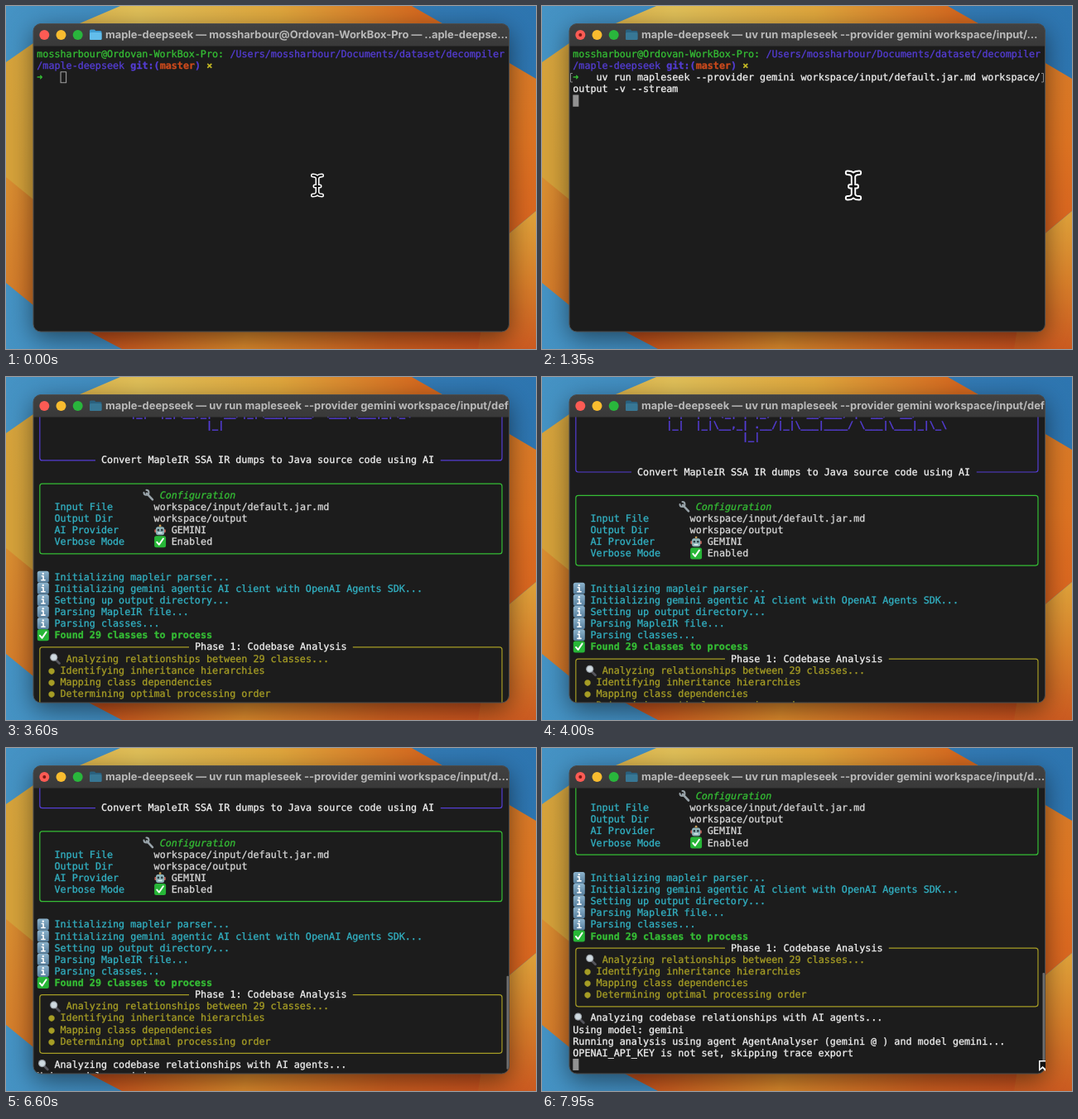
Recreate the animation shown at these times as an HTML page with a canvas. Size 640 by 415 pixels, loop 8 s.

```html
<!DOCTYPE html>
<html lang="en">
<head>
<meta charset="utf-8">
<title>Terminal session</title>
<style>
html, body { margin: 0; width: 100%; height: 100%; overflow: hidden; background: #000; }
canvas { display: block; width: 640px; height: 415px; }
</style>
</head>
<body>
<canvas id="stage"></canvas>
<script>
const W = 640, H = 415, LOOP = 8000;
const CELL = 7.065, ROW = 14.13, LEFT = 37.3, FIRST_BASELINE = 62;
const MONO = '11.735px "DejaVu Sans Mono", monospace';
const USER = 'mossharbour', HOST = 'Ordovan-WorkBox-Pro';
const GREEN = '#35bd35', BLUE = '#543dd4', CYAN = '#32b1c3', YELLOW = '#a69d25',
      GRAY = '#d6d6d6', WHITE = '#f0f0f0', ORANGE = '#cc4a1c';

const canvas = document.getElementById('stage');
const ctx = canvas.getContext('2d');
const ratio = window.devicePixelRatio || 1;
canvas.width = W * ratio;
canvas.height = H * ratio;
ctx.scale(ratio, ratio);
ctx.lineCap = ctx.lineJoin = 'round';
ctx.textRendering = 'geometricPrecision';

// Times in ms
const FOCUS = 50, PASTE = 350, ENTER = 900, OUTPUT = 2650;
const SCROLL = [[2900, 0], [3700, 6], [4750, 6], [5500, 5], [6950, 2], [7750, -1]];
const CONFIG_ROW = 16;

// A line is a list of [column, text or icon, colour, style]
const command = [
  [[0, '➜', GREEN, 'bold'], [4, 'uv run mapleseek --provider gemini workspace/input/default.jar.md workspace/', WHITE]],
  [[0, 'output -v --stream', WHITE]]
];
const prompt = [
  [[0, `${USER}@${HOST}:`, GREEN], [33, `/Users/${USER}/Documents/dataset/decompiler`, BLUE]],
  [[0, '/maple-deepseek', BLUE], [16, 'git:(', BLUE, 'bold'], [21, 'master', ORANGE, 'bold'],
   [27, ')', BLUE, 'bold'], [29, '×', '#c9bd25', 'bold']]
];
const art = String.raw`
 __  __             _      ____            _
|  \/  | __ _ _ __ | | ___/ ___|  ___  ___| | __
| |\/| |/ _' | '_ \| |/ _ \___ \ / _ \/ _ \ |/ /
| |  | | (_| | |_) | |  __/___) |  __/  __/   <
|_|  |_|\__,_| .__/|_|\___|____/ \___|\___|_|\_\
             |_|`.split('\n').slice(1).map(s => [[16, s, BLUE, 'bold']]);
const setting = (label, value, icon) =>
  icon ? [[3, label, CYAN], [20, icon], [23, value, GRAY]] : [[3, label, CYAN], [20, value, GRAY]];
const info = text => [[0, drawInfo], [3, text, CYAN]];
const bullet = text => [[2, '●', YELLOW], [4, text, YELLOW]];
const plain = text => [[0, text, WHITE]];

const lines = [
  ...prompt, ...command,
  [], [], ...art, [], [],
  [[11, 'Convert MapleIR SSA IR dumps to Java source code using AI', WHITE]],
  [], [],
  [[18, drawWrench], [21, 'Configuration', GREEN, 'italic']],
  setting('Input File', 'workspace/input/default.jar.md'),
  setting('Output Dir', 'workspace/output'),
  setting('AI Provider', 'GEMINI', drawRobot),
  setting('Verbose Mode', 'Enabled', drawCheck),
  [], [],
  info('Initializing mapleir parser...'),
  info('Initializing gemini agentic AI client with OpenAI Agents SDK...'),
  info('Setting up output directory...'),
  info('Parsing MapleIR file...'),
  info('Parsing classes...'),
  [[0, drawCheck], [3, 'Found 29 classes to process', GREEN, 'bold']],
  [[27, 'Phase 1: Codebase Analysis', WHITE]],
  [[2, drawLens], [5, 'Analyzing relationships between 29 classes...', YELLOW]],
  bullet('Identifying inheritance hierarchies'),
  bullet('Mapping class dependencies'),
  bullet('Determining optimal processing order'),
  [],
  [[0, drawLens], [3, 'Analyzing codebase relationships with AI agents...', WHITE]],
  plain('Using model: gemini'),
  plain('Running analysis using agent AgentAnalyser (gemini @ ) and model gemini...'),
  plain('OPENAI_API_KEY is not set, skipping trace export')
];
// First row, last row, colour, and the row and columns of a gap for the title
const panels = [
  [4, 14, BLUE, 14, 10, 69],
  [16, 22, GREEN],
  [30, 35, YELLOW, 30, 26, 54]
];

function shape(fill, points) {
  ctx.fillStyle = fill;
  ctx.beginPath();
  points.forEach(([x, y]) => ctx.lineTo(x, y));
  ctx.fill();
}
function box(x, y, w, h, r, fill) {
  ctx.fillStyle = fill;
  ctx.beginPath();
  ctx.roundRect(x, y, w, h, r);
  ctx.fill();
}
function disc(x, y, r, fill) {
  ctx.fillStyle = fill;
  ctx.beginPath();
  ctx.arc(x, y, r, 0, 7);
  ctx.fill();
}
function stroke(path, color, width) {
  ctx.strokeStyle = color;
  ctx.lineWidth = width;
  ctx.stroke(new Path2D(path));
}
function blend(x0, y0, x1, y1, ...colors) {
  const g = ctx.createLinearGradient(x0, y0, x1, y1);
  colors.forEach((c, i) => g.addColorStop(i / (colors.length - 1), c));
  return g;
}

// Icons are drawn in a 14 by 14 square
function drawInfo() {
  box(0, 0, 14, 14, 2.5, blend(0, 0, 0, 14, '#8cb3cc', '#587f9d'));
  stroke('M5.5 6H7.3V11M5 11H9.3', '#fff', 1.6);
  disc(7, 3.2, 1.2, '#fff');
}
function drawCheck() {
  box(0, 0, 14, 14, 2.5, '#27b637');
  stroke('M3.2 7.5 5.8 10.5 10.8 3.2', '#fff', 2);
}
function drawWrench() {
  stroke('M5 5 12 12.5', '#99a4aa', 2.6);
  stroke('M1.5 4A3 3 0 1 0 4.5 1', '#99a4aa', 2);
}
function drawLens() {
  stroke('M8.5 9 12.5 13', '#55555c', 2.8);
  disc(5.8, 5.6, 4.6, '#9aa1a8');
  disc(5.8, 5.6, 3.4, '#cfdae0');
}
function drawRobot() {
  box(.3, 6, 13.4, 4, 1, '#c0625a');
  box(2, 3, 10, 10, 2.5, '#8fb4b9');
  disc(7, 1.8, 1.4, '#c59a54');
  disc(4.8, 7, 1.3, '#25383e');
  disc(9.2, 7, 1.3, '#25383e');
  stroke('M5 10.5H9', '#e6eeee', 1.4);
}

function drawWallpaper() {
  ctx.fillStyle = blend(0, 0, 640, 0, '#4593c4', '#397fb7', '#2d75b0');
  ctx.fillRect(0, 0, W, H);
  // Upper petals
  shape(blend(0, 80, 500, 0, '#d6a23a', '#e0bf58', '#dfa63c', '#d5691f'),
    [[0, 68], [33, 45], [138, 0], [490, 0], [525, 20], [560, 240], [0, 240]]);
  // Lower petals, leaving the bottom left corner blue
  shape(blend(0, 205, 640, 400, '#d98f31', '#c9521c', '#dc8a2c', '#cf5f20', '#c94c1d'),
    [[0, 207], [33, 234], [560, 234], [640, 415], [140, 415], [100, 394], [33, 362], [0, 335]]);
  // Right petals
  shape(blend(0, 60, 0, 270, '#d87b28', '#dd7322', '#d9641f'),
    [[525, 20], [640, 88], [640, 248], [590, 290], [540, 290]]);
  shape(blend(0, 250, 0, 415, '#dfa23a', '#d77f2a', '#cb5a20'),
    [[640, 248], [640, 415], [570, 415], [590, 290]]);
}

function drawText(text, column, baseline, color, style = '') {
  ctx.font = `${style} ${MONO}`;
  ctx.fillStyle = ctx.strokeStyle = color;
  ctx.lineWidth = .3;
  const x = LEFT + column * CELL;
  ctx.fillText(text, x, baseline);
  ctx.strokeText(text, x, baseline);
}
function drawLine(line, baseline) {
  for (const [column, content, color, style] of line) {
    if (typeof content === 'string') {
      drawText(content, column, baseline, color, style);
    } else {
      ctx.save();
      ctx.translate(LEFT + column * CELL + .5, baseline - 11);
      content();
      ctx.restore();
    }
  }
}
function drawPanel([first, last, color, gapRow, gapStart, gapEnd], rowMiddle) {
  const x0 = LEFT + CELL / 2, x1 = LEFT + 79.5 * CELL;
  const y0 = rowMiddle(first), y1 = rowMiddle(last);
  ctx.save();
  if (gapRow) {
    const hole = new Path2D();
    hole.rect(0, -400, W, 1600);
    hole.rect(LEFT + gapStart * CELL, rowMiddle(gapRow) - 7, (gapEnd - gapStart) * CELL, 14);
    ctx.clip(hole, 'evenodd');
  }
  ctx.strokeStyle = color;
  ctx.lineWidth = 1.2;
  ctx.beginPath();
  ctx.roundRect(x0, y0, x1 - x0, y1 - y0, 3);
  ctx.stroke();
  ctx.restore();
}
function drawCaret(column, baseline, hollow) {
  const x = LEFT + column * CELL, y = baseline - 11;
  if (hollow) {
    ctx.strokeStyle = '#a0a0a0';
    ctx.lineWidth = 1.1;
    ctx.strokeRect(x + .5, y + .5, CELL - .5, 13);
  } else {
    box(x, y, CELL, ROW, 0, '#929292');
  }
}

function scrollAt(t) {
  const next = SCROLL.findIndex(([time]) => time > t);
  if (next === 0) return 0;
  if (next < 0) return SCROLL.at(-1)[1];
  const [t0, a] = SCROLL[next - 1], [t1, b] = SCROLL[next];
  return Math.round(a + (b - a) * (t - t0) / (t1 - t0));
}

function drawTerminal(t) {
  const done = t >= OUTPUT;
  const top = done ? CONFIG_ROW - scrollAt(t) : 0;
  const baseline = row => FIRST_BASELINE + (row - top) * ROW;
  const middle = row => baseline(row) - 3.5;

  if (done) {
    const count = t < 5000 ? lines.length - 1 : lines.length;
    panels.forEach(panel => drawPanel(panel, middle));
    lines.slice(0, count).forEach((line, row) => drawLine(line, baseline(row)));
    drawCaret(0, baseline(count));
  } else {
    prompt.forEach((line, row) => drawLine(line, baseline(row)));
    if (t < PASTE) {
      drawLine(command[0].slice(0, 1), baseline(2));
      drawCaret(4, baseline(2), t < FOCUS);
    } else {
      command.forEach((line, i) => drawLine(line, baseline(i + 2)));
      drawCaret(t < ENTER ? 18 : 0, baseline(t < ENTER ? 3 : 4));
    }
    if (t >= ENTER) {
      stroke('M36.5 81.5H34.5V92H36.5M603.5 81.5H605.5V92H603.5', '#8b8b8b', 1);
    }
  }
  if (t >= 4750) box(604.5, 282 - Math.min(10, (t - 4750) / 300), 2.5, 113, 1, '#6d6d6d');
}

function titleAt(t) {
  if (t < ENTER) return `maple-deepseek — ${USER}@${HOST} — ..aple-deepse…`;
  const tail = t < 3500 ? '…' : t < 4750 ? 'default.jar.md' : 'd…';
  return 'maple-deepseek — uv run mapleseek --provider gemini workspace/input/' + tail;
}
function drawTitleBar(t) {
  ctx.fillStyle = blend(0, 22, 0, 48, '#414141', '#393939');
  ctx.fillRect(33, 21, 575, 27.5);
  ['#fc5b54', '#f9bc2f', '#29b63c'].forEach((color, i) => disc(46.3 + 20.2 * i, 35, 6, color));
  const running = t >= ENTER && !(t >= 3500 && t < 4750) && !(t >= 6650 && t < 7550);
  if (running) disc(46.3, 35, 2, '#7c1713');
  const folder = t < ENTER ? ['#3f9dd3', '#62bdeb'] : ['#2a617f', '#377795'];
  box(101, 28.5, 7, 5, 1.5, folder[0]);
  box(101, 30, 14.5, 11, 1.5, folder[0]);
  box(101, 32, 14.5, 9, 1.5, folder[1]);
  ctx.font = '700 12.9px Inter, sans-serif';
  ctx.fillStyle = '#b9b9b9';
  ctx.fillText(titleAt(t), 120, 39);
}

function drawPointer(t) {
  if (t < 2900) {
    const grown = 1 + .27 * Math.min(1, Math.max(0, (t - FOCUS) / 800));
    const leave = Math.max(0, (t - OUTPUT) / 200);
    const beam = 'M-5.5 -12Q0 -12 0 -8V8Q0 12 -5.5 12M5.5 -12Q0 -12 0 -8M0 8Q0 12 5.5 12M-3 1H3';
    ctx.save();
    ctx.globalAlpha = Math.max(0, 1 - leave * .4);
    ctx.translate(376, 217 + 26 * leave);
    ctx.scale(grown, grown);
    stroke(beam, '#fff', 5);
    stroke(beam, '#111', 2);
    ctx.restore();
  }
  if (t >= 7700) {
    shape('#fff', [[600, 378], [608, 378], [608, 391], [604.5, 387.5], [600, 391]]);
    shape('#111', [[601.5, 379.5], [608, 379.5], [608, 388], [604.5, 385], [601.5, 388]]);
  }
}

function draw() {
  const t = performance.now() % LOOP;
  drawWallpaper();
  ctx.save();
  ctx.shadowColor = 'rgba(0,0,0,.5)';
  ctx.shadowBlur = 30 * ratio;
  ctx.shadowOffsetY = 8 * ratio;
  box(33, 21.5, 574.5, 372.5, 9, '#1c1c1c');
  ctx.restore();

  ctx.save();
  ctx.beginPath();
  ctx.roundRect(33, 21.5, 574.5, 372.5, 9);
  ctx.clip();
  drawTerminal(t);
  drawTitleBar(t);
  ctx.restore();

  ctx.strokeStyle = '#4c4c4c';
  ctx.lineWidth = 1;
  ctx.beginPath();
  ctx.roundRect(33, 21.5, 574.5, 372.5, 9);
  ctx.stroke();
  drawPointer(t);
  requestAnimationFrame(draw);
}
draw();
</script>
</body>
</html>
```
